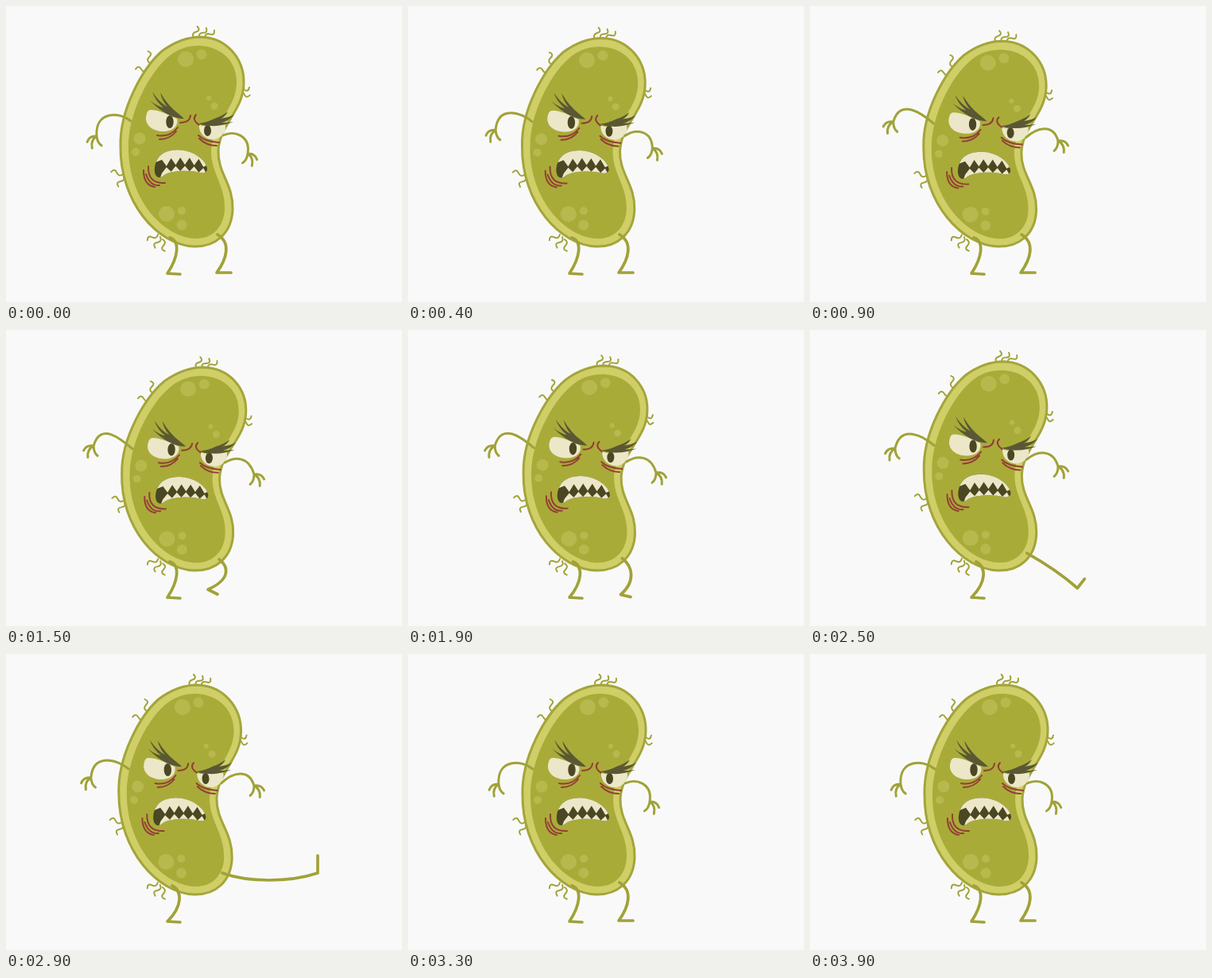
Recreate the animation shown at these times as an HTML page. Size 498 px wide and 373 px high, loop 4 s.

```html
<!DOCTYPE html>
<html lang="en">
<head>
<meta charset="utf-8">
<title>Angry germ kick</title>
<style>
html, body { margin: 0; width: 100%; height: 100%; overflow: hidden; background: #f9f9f9; }
svg { display: block; width: 100vw; height: 100vh; }
.line { fill: none; stroke: #a0a238; stroke-width: 3; stroke-linecap: round; stroke-linejoin: round; }
.leg { stroke-width: 3.7; }
.hair { stroke-width: 2; }
.bubble { fill: #b7b94e; }
.white { fill: #ece7c8; }
.dark { fill: #4b4723; }
.brow { fill: #5a5834; }
.red { fill: none; stroke: #933f35; stroke-width: 2; stroke-linecap: round; }
</style>
</head>
<body>
<svg viewBox="0 0 498 373">
  <defs>
    <clipPath id="mouthClip"><use href="#mouth"/></clipPath>
  </defs>
  <g id="body">
    <path id="hairs" class="line hair"/>
    <path fill="#cfce67" stroke="#a3a53b" stroke-width="3" d="M245 39C278 40 300 67 299 98C298 133 269 148 267 182C266 211 286 224 285 256C284 287 263 304 236 303C191 301 143 248 144 176C143 130 172 78 196 57C212 45 228 39 245 39Z"/>
    <path fill="#a9ab39" d="M243 50C272 51 291 71 290 98C289 130 259 147 258 183C258 211 276 226 275 256C274 279 259 294 237 293C197 291 153 242 154 177C154 135 179 86 203 65C215 54 229 50 243 50Z"/>
    <g id="bubbles"></g>
    <path class="red" d="M190 163Q206 166 216 153M193 168Q206 168 214 158M219 147Q231 147 232 138M239 137Q233 143 243 150
      M242 163Q250 171 268 172M243 167Q252 176 265 176M179 202Q178 224 200 223M173 207Q173 226 187 228M176 212Q181 227 193 226"/>
    <path class="white" d="M181 131C190 130 205 137 215 142C217 149 212 158 198 158C184 158 175 150 176 140C177 134 178 132 181 131Z"/>
    <path class="white" d="M243 150C252 153 262 150 275 149C278 155 275 165 262 168C250 169 242 159 243 150Z"/>
    <ellipse class="dark" cx="206" cy="146" rx="4.700" ry="8"/>
    <ellipse class="dark" cx="253.500" cy="157" rx="4.500" ry="7"/>
    <path class="brow" d="M224 142Q203 142 181 119Q191 127 198 128Q188 120 184 108Q192 121 203 127Q196 119 194 109Q203 125 216 135Q221 139 224 142Z"/>
    <path class="brow" d="M242 148Q252 147 262 142Q273 138 279 133Q276 139 270 142Q279 141 287 137Q280 145 271 147Q279 147 286 146Q270 152 258 151Q248 151 242 148Z"/>
    <path id="mouth" class="dark" d="M193 216C186 216 185 203 190 194C196 182 212 180 224 182C240 185 252 196 253 205C253 210 249 211 244 210C230 206 206 208 199 213Q196 216 193 216Z"/>
    <path id="teeth" class="white" clip-path="url(#mouthClip)"/>
  </g>
  <path id="armL" class="line"/>
  <path id="armR" class="line"/>
  <path id="legL" class="line leg"/>
  <path id="legR" class="line leg"/>
</svg>
<script>
const LOOP = 4000, STEP = 100, FLOOR = 303, HEIGHT = 265;
const el = id => document.getElementById(id);
const setPath = (id, d) => el(id).setAttribute('d', d);
const rad = deg => deg * Math.PI / 180;

function turn(x, y, deg) {
  const c = Math.cos(rad(deg)), s = Math.sin(rad(deg));
  return [x * c - y * s, x * s + y * c];
}

// wavy hairs in a row, each turned a little further than the last
function tuft(x, y, dx, dy, count, angle, fan) {
  let d = '';
  for (let i = 0; i < count; i++) {
    const at = (u, v) => {
      const [px, py] = turn(u, v, angle + fan * i);
      return [x + dx * i + px, y + dy * i + py];
    };
    d += `M${at(0, 0)}Q${at(4, -5)} ${at(8, 0)}T${at(15, -1)}`;
  }
  return d;
}

function teeth() {
  const row = (valley, tip) => {
    let d = '';
    for (let i = 0; i < 10; i++) {
      const x = 196 + 5.8 * i, arch = 0.004 * (x - 222) ** 2;
      d += `L${x} ${(i % 2 ? tip : valley) + arch}`;
    }
    return d;
  };
  return `M184 176L188 197${row(191, 200)}L258 198V176Z` +
    `M192 222${row(208, 201.5)}L258 222Z`;
}

setPath('hairs', tuft(236, 40, 7, 0, 3, -68, 17) + tuft(181, 72, -3, 9, 2, -95, -75) +
  tuft(292, 108, 0, 1, 2, -18, 35) + tuft(147, 212, 1, 2, 2, 195, -75) +
  tuft(191, 288, 3, 3, 3, 155, -36));
setPath('teeth', teeth());
el('bubbles').innerHTML = [
  [226, 67, 10], [246, 61, 6.5], [255, 116, 3], [262, 126, 4.5], [168, 167, 7.5],
  [163, 184, 5], [202, 262, 10], [221, 258, 5], [221, 276, 6.5]
].map(([x, y, r]) => `<circle class="bubble" cx="${x}" cy="${y}" r="${r}"/>`).join('');

// smooth 0 to 1 between two times, and a rise followed by a fall
function ramp(t, from, to) {
  const u = Math.min(1, Math.max(0, (t - from) / (to - from)));
  return u * u * (3 - 2 * u);
}
const pulse = (t, a, b, c, d) => ramp(t, a, b) - ramp(t, c, d);
const mix = (a, b, u) => a.map((v, i) => v + (b[i] - v) * u);

// hip, two bends, ankle, toe
const stand = [266, 288, 283, 298, 278, 318, 265, 336, 283, 336];
const lift = [268, 289, 280, 298, 283, 314, 254, 327, 266, 333];
const swing = [273, 284, 288, 296, 299, 322, 306, 352, 320, 346];
const high = [272, 276, 305, 288, 356, 288, 392, 276, 392, 254];

function kickLeg(t) {
  let p = mix(stand, lift, ramp(t, 1100, 1500));
  p = mix(p, swing, ramp(t, 1700, 2300));
  p = mix(p, high, ramp(t, 2300, 2800));
  return mix(p, stand, ramp(t, 2900, 3300));
}

function arm(id, shoulder, lead, [x, y], bend, reach, side) {
  const at = (u, v, deg) => {
    const [px, py] = turn(u * side, v, deg);
    return [x + px, y + py];
  };
  const tilt = bend * 0.3;
  const finger = (bx, by, tx, ty) => `M${x} ${y}Q${at(bx, by, tilt)} ${at(tx, ty, tilt)}`;
  setPath(id, `M${shoulder}C${lead} ${at(0, -reach, bend)} ${x} ${y}` +
    finger(-9, -1, -12, 7) + finger(-8, 5, -6, 15) + finger(1, 9, 6, 12));
}

function draw(t) {
  const up = pulse(t, 0, 900, 2900, 3300);
  const kick = pulse(t, 2300, 2800, 2900, 3300);
  const drop = 8 * pulse(t, 0, 1500, 1500, 2750);
  const lean = 3.5 * pulse(t, 1000, 1500, 1500, 2600) -
    2.5 * pulse(t, 0, 900, 900, 1400) - 4.5 * kick;

  const sy = 1 - drop / HEIGHT, k = -lean / HEIGHT;
  el('body').setAttribute('transform', `matrix(1 0 ${k} ${sy} ${-k * FLOOR} ${FLOOR * (1 - sy)})`);
  const onBody = (x, y) => [x + k * (y - FLOOR), FLOOR + (y - FLOOR) * sy];

  const raise = up - 0.55 * kick;
  const [lx, ly] = onBody(157, 145);
  arm('armL', [lx, ly], [lx - 14, ly - 12],
    [114 - 7 * raise + 0.9 * lean, 164 - 18 * raise], -4 + 20 * raise, 32, 1);

  const wrist = [304 + 8 * up, 186 - 11 * up + 2 * lean];
  const [rx, ry] = onBody(273, 163);
  arm('armR', [rx, ry], [rx + 14, ry - 7 + (wrist[1] - 186) * 0.35],
    wrist, 9 - 25 * up, 23, -1);

  const w = pulse(t, 1500, 2300, 2900, 3300);
  setPath('legL', `M${206 + 3 * w} 292C${219 + 3 * w} ${296 + 3 * w} ${217 + 5 * w} ${316 + 2 * w} 203 337L219 338`);

  const p = kickLeg(t);
  setPath('legR', `M${p.slice(0, 2)}C${p.slice(2, 8)}L${p.slice(8)}`);
}

function tick(now) {
  draw(Math.floor((now % LOOP) / STEP) * STEP);
  requestAnimationFrame(tick);
}
draw(0);
requestAnimationFrame(tick);
</script>
</body>
</html>
```
